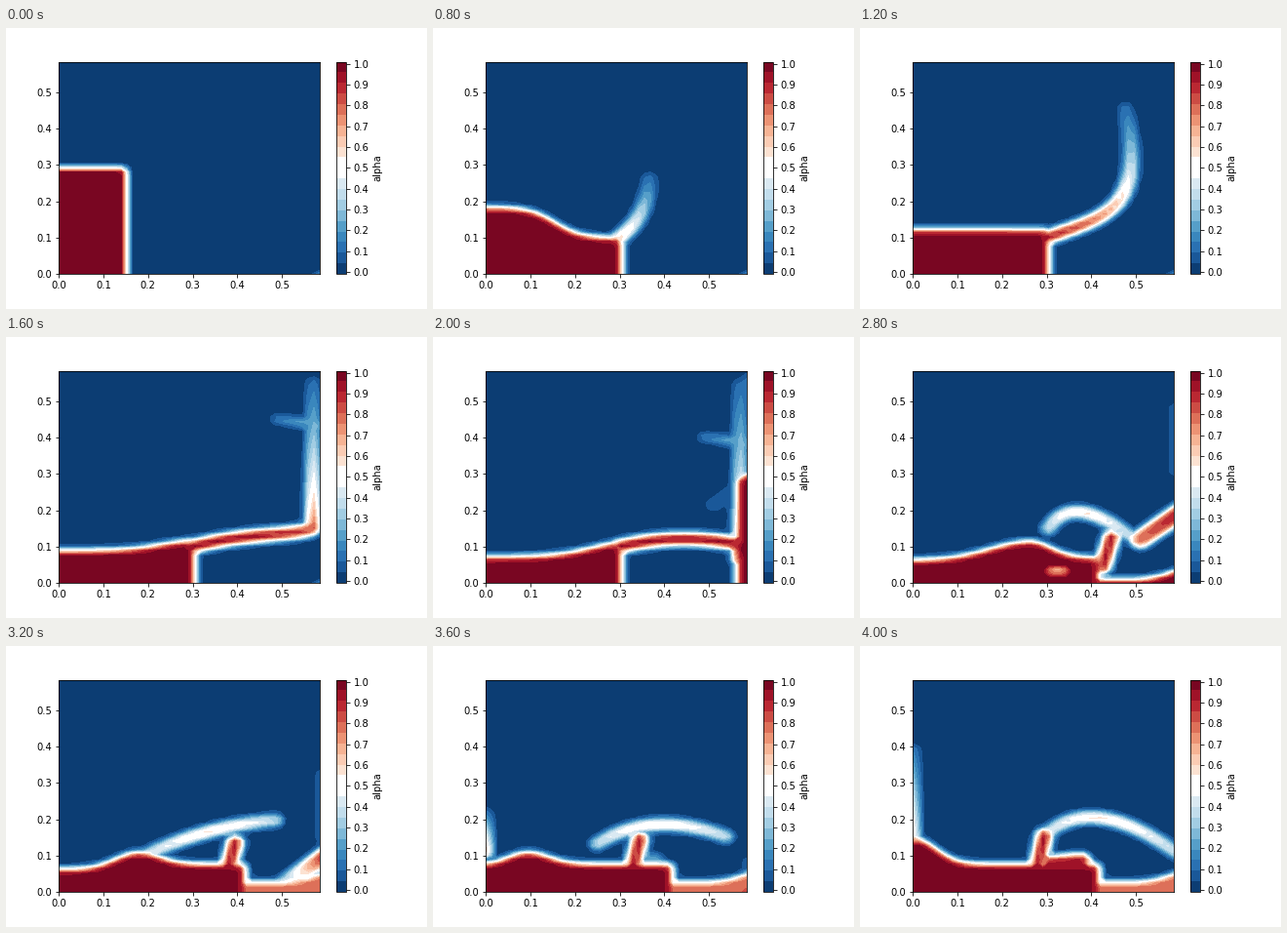
These frames come from a looping animation (432x288 px, 4200 ms). A matplotlib script:

```python
import numpy as np
import matplotlib.pyplot as plt
from matplotlib.animation import FuncAnimation

plt.rcParams.update({"font.family": "DejaVu Sans", "font.size": 10})

# Lengths in mm, times in seconds of flow; one frame is 0.05 s of flow.
SIZE, STEP, GRAVITY = 584, 0.05, 9810
FRAMES, INTERVAL = 21, 200
EDGE = 9

# Folding crest: start, middle and end of its curve at a few times.
ARC_TIMES = (0.6, 0.7, 0.8, 1.0)
ARC_X = ((350, 304, 200, 300), (430, 375, 340, 425), (530, 485, 485, 590))
ARC_Y = ((118, 150, 105, 160), (196, 195, 167, 203), (190, 130, 197, 108))

axis = np.linspace(0, SIZE, 47)
X, Y = np.meshgrid(axis, axis)


def ramp(t, start, end):
    """Smooth step from 0 to 1."""
    u = np.clip((t - start) / (end - start), 0, 1)
    return u * u * (3 - 2 * u)


def pulse(t, start, full, hold, end):
    return ramp(t, start, full) * (1 - ramp(t, hold, end))


def soft(distance, width=EDGE):
    return 0.5 - 0.5 * np.tanh(distance / width)


def stroke(x, y, radius, strength):
    """Soft-edged line of water; strength may vary along it."""
    strength = np.broadcast_to(strength, len(x))
    field = np.zeros_like(X)
    for i in range(len(x) - 1):
        dx, dy = x[i + 1] - x[i], y[i + 1] - y[i]
        u = ((X - x[i]) * dx + (Y - y[i]) * dy) / max(dx * dx + dy * dy, 1e-9)
        u = np.clip(u, 0, 1)
        gap = np.hypot(X - x[i] - u * dx, Y - y[i] - u * dy)
        power = strength[i] + u * (strength[i + 1] - strength[i])
        field = np.maximum(field, power * soft(gap - radius))
    return field


def bulk(t):
    """Collapsing column, then a bore that runs back to the left wall."""
    level = 42 + 249 / (1 + 0.135 * (10 * t) ** 2.5)
    toe = 122 * (1 - np.exp(-(t / 0.17) ** 3))
    center = 180 - 25 * ramp(t, 0, 0.1) + 85 * ramp(t, 0.2, 0.45)
    collapse = toe + (level - toe) * soft(axis - center, 10 + 110 * np.sqrt(t))

    crest = 342 - 850 * (t - 0.6)
    young = 1 - ramp(t, 0.6, 0.8)
    bore = 62 + 14 * (1 - young) * soft(crest - axis, 50)
    for middle in (crest, -crest):  # the mirrored wave is the wall's reflection
        width = np.where(axis < middle, 70 + 110 * young, 70)
        bore = bore + (38 + 20 * young) * np.exp(-((axis - middle) / width) ** 2)

    height = collapse + (bore - collapse) * ramp(t, 0.5, 0.6)
    depth = (Y - height) / np.hypot(1, np.gradient(height, axis))
    front = 152 + 153 * ramp(t, 0, 0.15) + 113 * ramp(t, 0.5, 0.6)
    width = 7 + 2 * ramp(t, 0, 0.2)
    return soft(depth, width) * soft(X - front, width)


def jet(t):
    """Water thrown off the obstacle, each bit on its own ballistic path."""
    if t <= 0.14:
        return np.zeros_like(X)
    launch = np.linspace(0.14, t, 26)
    age = t - launch
    surge = np.exp(-(launch - 0.14) / 0.07)
    x = 300 + (2100 - 1000 * surge) * age
    y = 100 + (600 + 2400 * surge) * age - GRAVITY / 2 * age**2
    strength = np.clip(1.12 - surge**0.8, 0, 1) * (1 - ramp(t, 0.5, 0.6))
    return stroke(np.minimum(x, 570), y, 15, strength)


def arc(t):
    xs, ys = ([np.interp(t, ARC_TIMES, p) for p in part] for part in (ARC_X, ARC_Y))
    s = np.linspace(0, 1, 12)
    curve_x = np.polyval(np.polyfit((0, 0.5, 1), xs, 2), s)
    curve_y = np.polyval(np.polyfit((0, 0.5, 1), ys, 2), s)
    body = 0.4 + 0.2 * np.sin(np.pi * s)
    return stroke(curve_x, curve_y, 14, body * ramp(t, 0.5, 0.6))


def finger(t):
    """Upright tongue at the edge of the air pocket, drifting left."""
    x, tip = 445 - 500 * (t - 0.7), 125 + 100 * (t - 0.7)
    tongue = stroke((x - 20, x), (45, tip), 16, 0.95 * ramp(t, 0.6, 0.7))
    shelf = stroke((x + 15, 375), (75, 82), 22, 0.95 * ramp(t, 0.85, 1))
    return np.maximum(tongue, shelf)


def right_wall(t):
    """Sheet on the wall, the roller that falls from it, and traces above."""
    top = 290 - 950 * max(t - 0.6, 0)
    sheet = stroke((590, 590), (-20, top - 20), 28, pulse(t, 0.42, 0.5, 0.6, 0.7))
    taper = np.array([0.95, 0.8 - 0.45 * ramp(t, 0.7, 0.8)])
    roller = stroke((600, 510), (top - 95 + 95, top - 75), 21,
                    taper * ramp(t, 0.48, 0.6))
    since = max(t - 0.6, 0)
    high = 560 - 400 * since - 4000 * since**2
    trace = stroke((587, 587), (high - 170, high), 13,
                   (0.17 - 0.08 * ramp(t, 0.6, 0.7)) * ramp(t, 0.42, 0.55))
    fall = 450 - GRAVITY / 2 * max(t - 0.4, 0) ** 2
    branch = stroke((490, 580), (fall, fall - 15), 11,
                    np.array([0.15, 0.3]) * pulse(t, 0.3, 0.4, 0.6, 0.7))
    return np.maximum.reduce([sheet, roller, trace, branch])


def floor_film(t):
    height = (-30 + 39 * ramp(t, 0.5, 0.6) + 18 * ramp(t, 0.7, 0.8)
              + 22 * (np.maximum(X - 490, 0) / 94) ** 2)
    return soft(Y - height) * (1 - 0.2 * ramp(t, 0.7, 0.8))


def run_up(t):
    top = max(390 - 1750 * (1 - t), 60)
    return stroke((0, 0), (min(110, top), top), 13,
                  np.array([0.7, 0.15]) * ramp(t, 0.8, 0.9))


def alpha(t):
    parts = (bulk, jet, arc, finger, right_wall, floor_film, run_up)
    water = np.maximum.reduce([part(t) for part in parts])
    rise = 5 + 280 * (t - 0.6)
    bubble = stroke((311, 337), (rise, rise), 5, 0.65 * pulse(t, 0.5, 0.6, 0.7, 0.8))
    return water * (1 - bubble)


levels = np.linspace(-0.01, 1.01, 21)
colors = [plt.cm.RdBu_r(0.025 + 0.05 * i) for i in range(20)]
colors[9] = colors[10] = "white"

fig, ax = plt.subplots(figsize=(6, 4), dpi=72)
fig.subplots_adjust(left=0.125, right=0.9, bottom=0.125, top=0.88)


def fill(frame):
    return ax.contourf(X / 1000, Y / 1000, alpha(frame * STEP),
                       levels=levels, colors=colors)


water = fill(0)
fig.colorbar(water, ax=ax, ticks=np.arange(11) / 10, format="%.1f", label="alpha")
ax.set(xlim=(0, SIZE / 1000), ylim=(0, SIZE / 1000))


def draw(frame):
    global water
    water.remove()
    water = fill(frame)
    return [water]


anim = FuncAnimation(fig, draw, frames=FRAMES, interval=INTERVAL, repeat=True)
plt.show()
```
